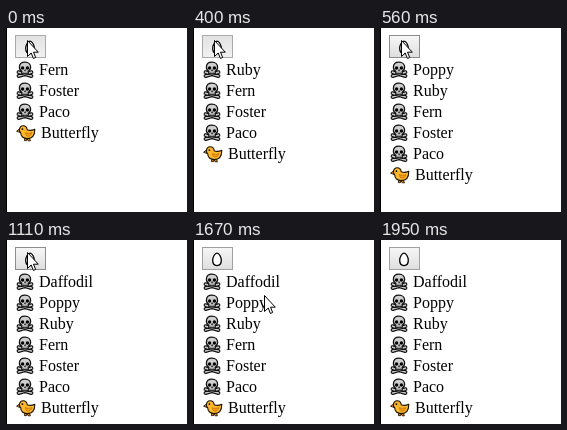
Recreate the animation shown at these times as an HTML page. Size 181x184 px, loop 2220 ms.

```html
<!DOCTYPE html>
<html lang="en">
<head>
<meta charset="utf-8">
<title>Hatchery</title>
<style>
html, body { margin: 0; width: 100%; height: 100%; overflow: hidden; background: #fff; }
svg { display: block; width: 100vw; height: 100vh; }
text { font: 16px "Liberation Serif", "Times New Roman", serif; fill: #000; }
</style>
</head>
<body>
<svg viewBox="0 0 181 184">
  <defs>
    <linearGradient id="up" x2="0" y2="1">
      <stop stop-color="#f7f7f7"/><stop offset="1" stop-color="#dedede"/>
    </linearGradient>
    <linearGradient id="down" x2="0" y2="1">
      <stop stop-color="#e2e2e2"/><stop offset="1" stop-color="#f1f1f1"/>
    </linearGradient>
    <g id="skull" stroke-linecap="round" stroke-linejoin="round">
      <g fill="none">
        <path d="M2.6 11.2L15.4 15M15.4 11.2L2.6 15" stroke="#111" stroke-width="4"/>
        <path d="M2.6 11.2L15.4 15M15.4 11.2L2.6 15" stroke="#c8c8c8" stroke-width="1.7"/>
      </g>
      <path d="M9 1.2C5.4 1.2 3.4 3.4 3.4 6.3C3.4 8.3 4.3 9.6 5.8 10.3V12.8H12.2V10.3C13.7 9.6 14.6 8.3 14.6 6.3C14.6 3.4 12.6 1.2 9 1.2Z" fill="#cfcfcf" stroke="#111" stroke-width="1.3"/>
      <circle cx="6.6" cy="7" r="1.7"/>
      <circle cx="11.4" cy="7" r="1.7"/>
      <path d="M9 8.7L8.4 9.8H9.6ZM7.9 11.2V12.4M10.1 11.2V12.4" stroke="#111" stroke-width=".6"/>
    </g>
    <g id="chick" stroke="#1c1200" stroke-linejoin="round" stroke-linecap="round">
      <path d="M9 13.5L8.4 16.6H10.6L11 14.5L12.2 16.8H14.4L13.2 13.5Z" fill="#f08a16" stroke-width=".9"/>
      <path d="M.9 7L3.8 4.8V8Z" fill="#f08a16" stroke-width=".9"/>
      <path d="M3.4 5.8C3.4 3.2 5.1 1.7 7.2 1.7C9.6 1.7 11 3.4 11.2 5.8C13.6 6.8 16.2 6.5 18.8 5.2C18.8 10.5 16.4 14.6 11.4 14.6C7.2 14.6 4.6 12.2 4.8 9C3.8 8.2 3.4 7 3.4 5.8Z" fill="#fdb72b" stroke-width="1.1"/>
      <path d="M9.7 8.9C11.6 9.6 13.8 9.5 15.8 8.6C15.3 11.2 13.5 12.4 11.6 12.2C10.2 11.9 9.6 10.6 9.7 8.9Z" fill="#f59d1a" stroke="#b96f00" stroke-width=".7"/>
      <circle cx="6.4" cy="5.1" r=".9" stroke="none"/>
    </g>
  </defs>
  <rect width="181" height="184" fill="#fff"/>
  <rect width="1" height="184" fill="#000"/>
  <rect id="button" x="9.5" y="7.5" width="30" height="22"/>
  <path d="M24 13.2C21.9 13.2 19.7 17 19.7 20.3C19.7 23.6 21.5 25.6 24 25.6C26.5 25.6 28.3 23.6 28.3 20.3C28.3 17 26.1 13.2 24 13.2Z" fill="#fff" stroke="#000" stroke-width="1.3"/>
  <g id="list"></g>
  <path id="cursor" d="M.5 .5V16.5L4.2 13L6.4 18.4L8.7 17.5L6.5 12.2H11.3Z" fill="#fff" stroke="#000"/>
</svg>
<script>
const LOOP = 2220, ROW = 21;
const names = ["Daffodil", "Poppy", "Ruby", "Fern", "Foster", "Paco", "Butterfly"];
const hatches = [150, 560, 1110];
const presses = [[0, 150], [400, 560], [960, 1110]];
const moves = [[0, 21, 12], [1670, 71, 55], [1820, 140, 168], [1950, -40, -40]];
const byId = id => document.getElementById(id);
const button = byId("button"), list = byId("list"), cursor = byId("cursor");

const rows = names.map((name, i) => {
  const chick = i === names.length - 1;
  const row = document.createElementNS("http://www.w3.org/2000/svg", "g");
  row.innerHTML = `<use href="#${chick ? "chick" : "skull"}" x="10" y="33"/>
    <text x="${chick ? 35 : 33}" y="47">${name}</text>`;
  return list.appendChild(row);
});

function draw(t) {
  const hidden = hatches.filter(at => t < at).length;
  rows.forEach((row, i) => {
    row.setAttribute("display", i < hidden ? "none" : "inline");
    row.setAttribute("transform", `translate(0 ${(i - hidden) * ROW})`);
  });

  const pressed = presses.some(([from, to]) => t >= from && t < to);
  const hover = t < 1670;
  button.setAttribute("fill", pressed ? "url(#down)" : "url(#up)");
  button.setAttribute("stroke", pressed ? "#a9a9a9" : hover ? "#8c8c8c" : "#a0a0a0");

  const [, x, y] = moves.filter(([at]) => t >= at).pop();
  cursor.setAttribute("transform", `translate(${x} ${y})`);
}

const start = performance.now();
function tick() {
  draw((performance.now() - start) % LOOP);
  requestAnimationFrame(tick);
}
draw(0);
requestAnimationFrame(tick);
</script>
</body>
</html>
```
